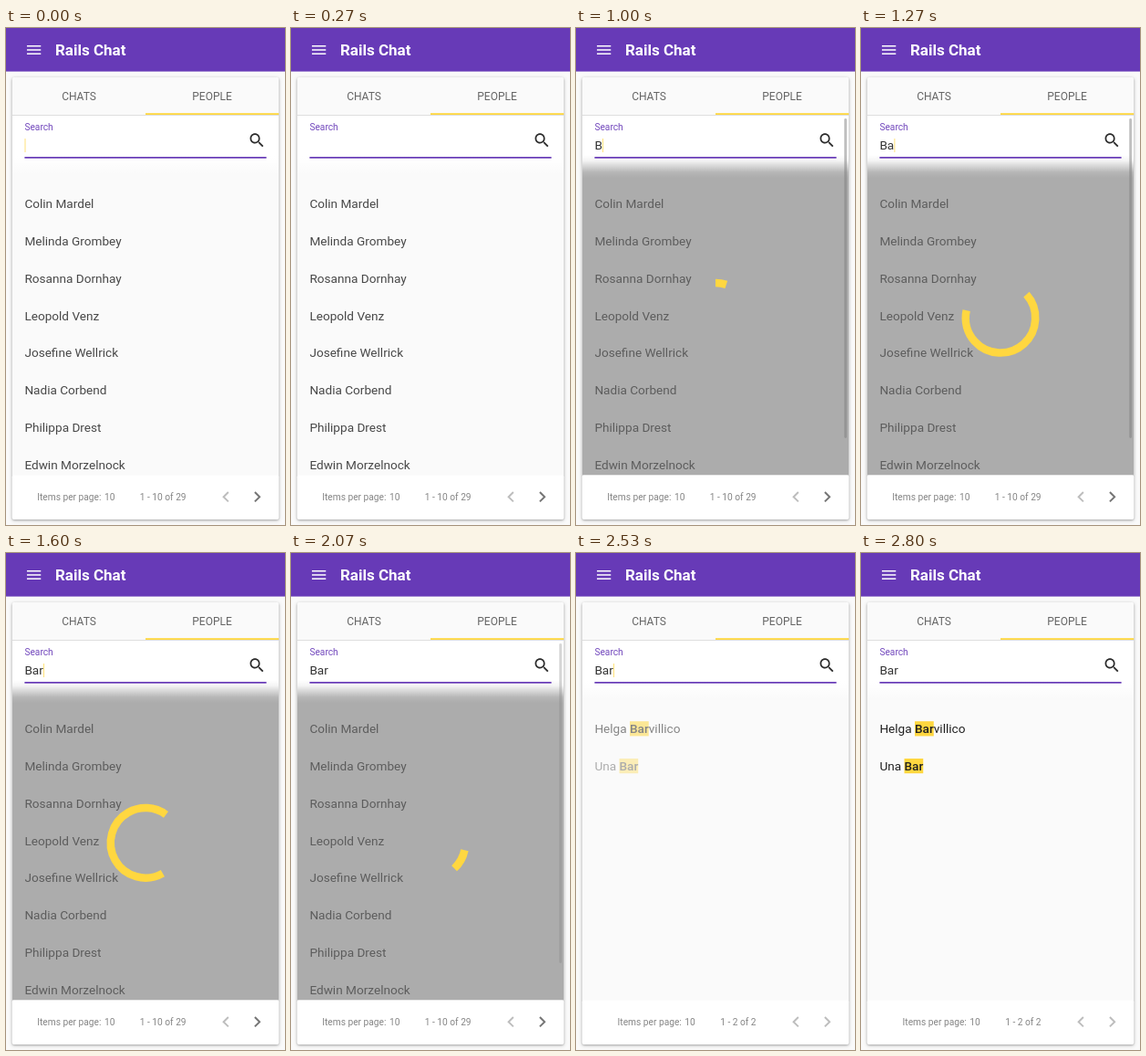
Animation, 306 px wide and 544 px high, one loop 2990 ms. Source, as an HTML page:

```html
<!DOCTYPE html>
<html lang="en">
<head>
<meta charset="utf-8">
<title>Chat people search</title>
<style>
  html, body { margin: 0; width: 100%; height: 100%; overflow: hidden; background: #fafafa; }
  svg { display: block; width: 100%; height: 100%; font-family: Roboto, sans-serif; }
  text { white-space: pre; }
  .card { filter: drop-shadow(0 1px 1px rgba(0,0,0,.26)) drop-shadow(0 1px 2px rgba(0,0,0,.18)); }
  .title { font-size: 17px; font-weight: 700; fill: #fff; }
  .tab { font-size: 12px; fill: #666; text-anchor: middle; }
  .row { font-size: 13.6px; }
  .small { font-size: 10.2px; fill: #858585; }
  .end { text-anchor: end; }
  .hit { font-weight: 500; }
</style>
</head>
<body>
<svg viewBox="0 0 306 544" xmlns="http://www.w3.org/2000/svg">
  <defs>
    <linearGradient id="fade" x1="0" y1="0" x2="0" y2="1">
      <stop offset="0" stop-color="#fff"/>
      <stop offset=".25" stop-color="#fff" stop-opacity=".87"/>
      <stop offset=".5" stop-color="#fff" stop-opacity=".5"/>
      <stop offset=".75" stop-color="#fff" stop-opacity=".13"/>
      <stop offset="1" stop-color="#fff" stop-opacity="0"/>
    </linearGradient>
    <clipPath id="view"><rect x="7" y="96" width="292" height="393.5"/></clipPath>
  </defs>

  <rect width="306" height="544" fill="#fafafa"/>
  <rect width="306" height="47.6" fill="#673ab7"/>
  <path transform="translate(20.4 13.8) scale(.85)" fill="#fff" d="M3 18h18v-2H3v2zm0-5h18v-2H3v2zm0-7v2h18V6H3z"/>
  <text class="title" x="54" y="30">Rails Chat</text>

  <rect class="card" x="6.8" y="54" width="292.4" height="483.8" rx="1.7" fill="#fafafa"/>
  <text class="tab" x="80" y="79.2">CHATS</text>
  <text class="tab" x="226" y="79.2">PEOPLE</text>
  <rect x="6.8" y="95" width="292.4" height=".9" fill="#dcdcdc"/>
  <rect x="153" y="93.2" width="146.2" height="1.8" fill="#ffd740"/>

  <g clip-path="url(#view)">
    <g id="people" fill="#484848"></g>
    <g id="found" fill="#212121"></g>
    <g id="busy">
      <rect x="6.8" y="96" width="292.4" height="394" fill="#6e6e6e" opacity=".55"/>
      <circle id="ring" cx="153" cy="317.3" r="38.25" fill="none" stroke="#ffd740" stroke-width="8.5"/>
    </g>
    <rect x="6.8" y="96" width="292.4" height="43" fill="#fff"/>
    <rect x="6.8" y="139" width="292.4" height="25" fill="url(#fade)"/>
    <rect id="bar" x="294.2" y="99" width="2.8" height="350" rx="1.4" fill="#808080"/>
  </g>

  <text class="small" x="20.4" y="112" style="fill:#7349bd">Search</text>
  <text class="row" id="query" x="20.4" y="133" fill="#333"></text>
  <rect id="caret" y="121" width="1" height="15" fill="#ffe27a"/>
  <rect x="20.4" y="141" width="265.2" height="1.7" fill="#673ab7"/>
  <path transform="translate(265 112.8) scale(.85)" fill="#2b2b2b" d="M15.5 14h-.79l-.28-.27C15.41 12.59 16 11.11 16 9.5 16 5.91 13.09 3 9.5 3S3 5.91 3 9.5 5.91 16 9.5 16c1.61 0 3.09-.59 4.23-1.57l.27.28v.79l5 4.99L20.49 19l-4.99-5zm-6 0C7.01 14 5 11.99 5 9.5S7.01 5 9.5 5 14 7.01 14 9.5 11.99 14 9.5 14z"/>

  <rect x="6.8" y="489.5" width="292.4" height="48.3" rx="1.7" fill="#fff"/>
  <g id="size">
    <text class="small" x="34.2" y="517">Items per page:</text>
    <text class="small end" x="119.4" y="517">10</text>
  </g>
  <text class="small end" id="range" x="197.6" y="517"></text>
  <path transform="translate(229.3 501.3) scale(.99)" fill="#bdbdbd" d="M15.41 7.41L14 6l-6 6 6 6 1.41-1.41L10.83 12z"/>
  <path id="next" transform="translate(263.7 501.3) scale(.99)" d="M10 6L8.59 7.41 13.17 12l-4.58 4.59L10 18l6-6z"/>
</svg>
<script>
const LOOP = 2990, TICK = 1000 / 15;
const BUSY = 1000, DONE = 2130, SHOW = 2330;
const NS = 'http://www.w3.org/2000/svg';
const $ = id => document.getElementById(id);
const clamp = v => Math.max(0, Math.min(1, v));

function add(parent, tag, attrs, text = '') {
  const el = document.createElementNS(NS, tag);
  for (const k in attrs) el.setAttribute(k, attrs[k]);
  el.textContent = text;
  parent.appendChild(el);
  return el;
}

const rowY = i => 197.2 + 40.8 * i;

['Colin Mardel', 'Melinda Grombey', 'Rosanna Dornhay', 'Leopold Venz',
 'Josefine Wellrick', 'Nadia Corbend', 'Philippa Drest', 'Edwin Morzelnock']
  .forEach((name, i) => add($('people'), 'text', { class: 'row', x: 20.4, y: rowY(i) }, name));

const hits = [['Helga ', 'villico'], ['Una ', '']].map(([head, tail], i) => {
  const g = add($('found'), 'g', {});
  const mark = add(g, 'rect', { y: rowY(i) - 13, height: 16.2, fill: '#ffd740' });
  const text = add(g, 'text', { class: 'row', x: 20.4, y: rowY(i) });
  add(text, 'tspan', {}, head);
  const hit = add(text, 'tspan', { class: 'hit' }, 'Bar');
  add(text, 'tspan', {}, tail);
  return { g, mark, hit, text, at: head.length };
});

function placeMarks() {
  for (const { mark, hit, text, at } of hits) {
    mark.setAttribute('x', text.getStartPositionOfChar(at).x);
    mark.setAttribute('width', hit.getComputedTextLength());
  }
}

// cubic-bezier(.35, 0, .25, 1)
function ease(x) {
  let lo = 0, hi = 1, s = .5;
  for (let i = 0; i < 24; i++) {
    s = (lo + hi) / 2;
    const bx = 1.05 * s * (1 - s) ** 2 + .75 * s * s * (1 - s) + s ** 3;
    if (bx < x) lo = s; else hi = s;
  }
  return 3 * s * s * (1 - s) + s ** 3;
}

// The arc grows clockwise for half a second, then its tail catches up.
function drawRing(ms) {
  const part = Math.floor(ms / 500), e = ease(ms % 500 / 500);
  const turn = ms * .18 - 90, quarter = Math.floor(part / 2) * 90;
  const shrink = part % 2;
  const len = 360 * (shrink ? .8 - .75 * e : .05 + .75 * e);
  const start = turn - quarter - (shrink ? 72.5 + len : 0);
  const unit = 2 * Math.PI * 38.25 / 360;
  $('ring').setAttribute('stroke-dasharray', `${len * unit} ${360 * unit}`);
  $('ring').setAttribute('transform', `rotate(${start} 153 317.3)`);
}

const show = (id, on) => $(id).setAttribute('opacity', +on);

function draw(time) {
  const t = Math.floor((time + 3.5) / TICK) * TICK + 4;
  const busy = t >= BUSY && t < DONE, done = t >= DONE;

  const typed = [930, 1130, 1330].filter(k => t >= k).length;
  const query = $('query');
  query.textContent = 'Bar'.slice(0, typed);
  $('caret').setAttribute('x', 20.5 + (typed ? query.getComputedTextLength() : 0));
  show('caret', t < 266 || (t >= 730 && t < 1866) || (t >= SHOW && t < 2800));

  show('people', !done);
  show('busy', busy);
  if (busy) drawRing(t - 4 - BUSY);
  const bar = clamp(t < 2000 ? (1600 - t) / 300 : (t - 2000) / 110);
  show('bar', busy ? bar * .5 : 0);

  show('found', done);
  hits.forEach(({ g }, i) => g.setAttribute('opacity', clamp((t - SHOW - 70 * i) / 390)));

  $('size').setAttribute('transform', `translate(${done ? 11.4 : 0} 0)`);
  $('range').textContent = done ? '1 - 2 of 2' : '1 - 10 of 29';
  $('next').setAttribute('fill', done ? '#bdbdbd' : '#757575');
}

const begin = performance.now();
function loop() {
  draw((performance.now() - begin) % LOOP);
  requestAnimationFrame(loop);
}
placeMarks();
loop();
</script>
</body>
</html>
```
